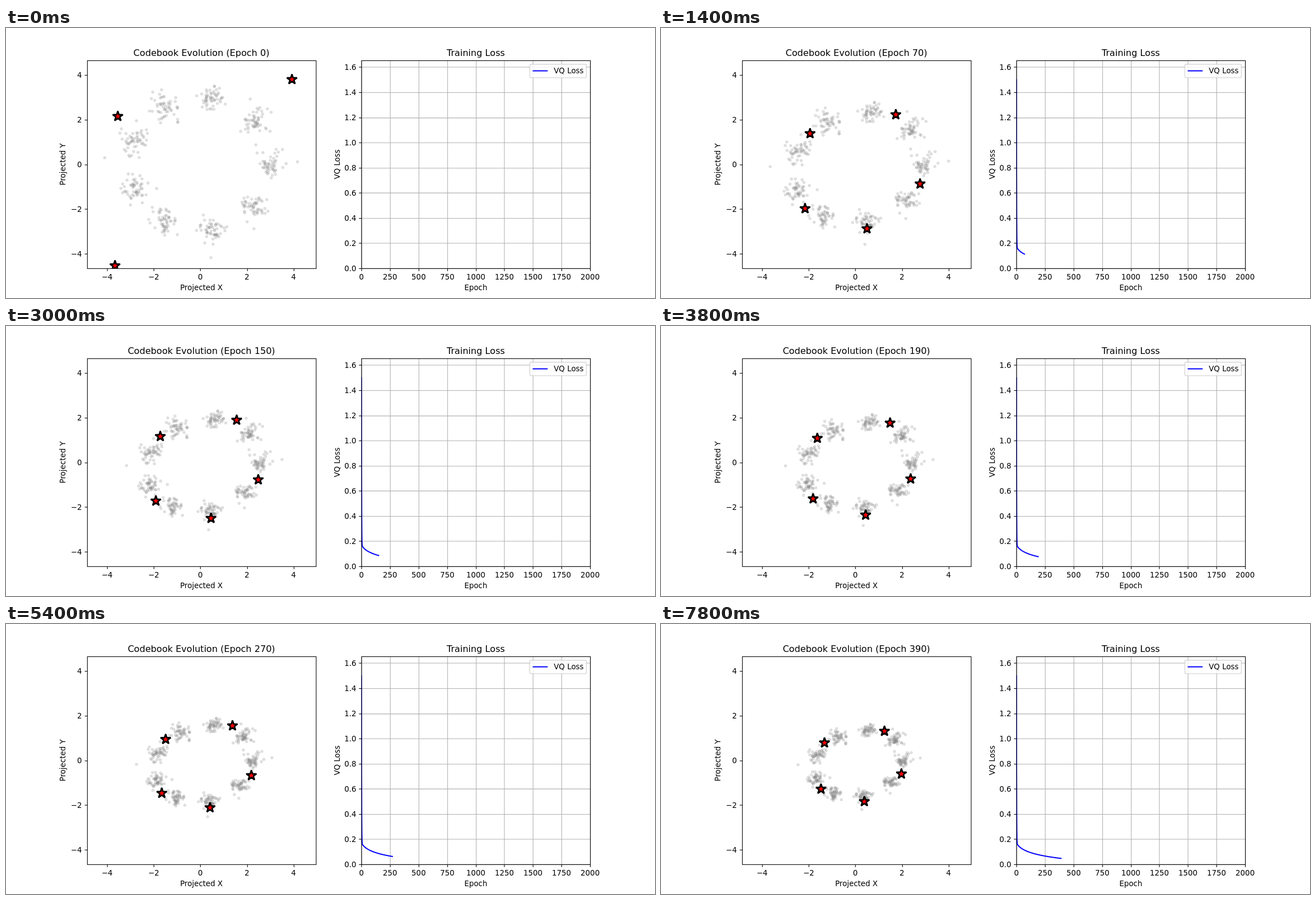
Animation of 1159x483 px, one loop 8 s. Source, as an HTML page with a canvas:

```html
<!DOCTYPE html>
<html lang="en">
<head>
<meta charset="utf-8">
<title>Codebook Evolution</title>
<style>
html, body { margin: 0; width: 100%; height: 100%; overflow: hidden; background: #fff; }
canvas { display: block; }
</style>
</head>
<body>
<canvas id="stage" width="1159" height="483"></canvas>
<script>
// The figure is laid out on 1200 x 500 units and scaled to the stage
const ctx = document.getElementById('stage').getContext('2d');
ctx.scale(1159 / 1200, 483 / 500);

const LOOP = 8000, STEP = 200, EPOCHS_PER_STEP = 10;
const TOP = 60, BOTTOM = 445, HEIGHT = BOTTOM - TOP, WIDTH = 422.73;
const LEFT_PLOT = 150, RIGHT_PLOT = 657.27;
const THIN = 1.11, THICK = 2.08;

const codeX = x => 359.3 + 43.1 * x;
const codeY = y => 252.6 - 41.4 * y;
const lossX = epoch => RIGHT_PLOT + epoch * WIDTH / 2000;
const lossY = loss => BOTTOM - 232.9 * loss;

// Codebook vectors: initial place, and place once pulled onto the data
const codes = [
  { start: [3.93, 3.8], near: [1.86, 2.46] },
  { start: [-3.54, 2.15], near: [-2.1, 1.53] },
  { start: [6, -2], near: [2.98, -.94] },
  { start: [-3.66, -4.53], near: [-2.33, -2.15] },
  { start: [1, -6], near: [.53, -3.14] }
];

let seed = 7;
function random() {
  seed = (seed * 16807) % 2147483647;
  return seed / 2147483647;
}
const normal = () => Math.sqrt(-2 * Math.log(random())) * Math.cos(2 * Math.PI * random());

// Nine Gaussian clusters on a circle
const points = [];
for (let k = 0; k < 9; k++)
  for (let i = 0; i < 55; i++) {
    const angle = k * 2 * Math.PI / 9;
    points.push([3 * Math.cos(angle) + .3 * normal(), 3 * Math.sin(angle) + .3 * normal()]);
  }

// Logarithmic contraction, equal to 1 at epoch 30
const shrink = (epoch, rate, delay) => 1 - rate * Math.log((epoch + delay) / (30 + delay));

function cloudMap(epoch) {
  if (!epoch) return p => p;
  const sx = 1.03 * shrink(epoch, .197, 30), sy = .945 * shrink(epoch, .244, 30);
  return ([x, y]) => [sx * x + .035 * y + .137, sy * y + .048 * x - .15];
}

function codeAt({ start, near: [x, y] }, epoch) {
  if (!epoch) return start;
  return [
    .12 + (x - .12) * shrink(epoch, .264, 100),
    -.17 + (y + .17) * shrink(epoch, .33, 100)
  ];
}

const lossAt = epoch => .3247 - .046 * Math.log(epoch + 30) + 1.33 * Math.exp(-epoch / 1.2);

function text(str, x, y, align = 'center', size = 13.89) {
  ctx.font = `${size}px "DejaVu Sans", sans-serif`;
  ctx.textAlign = align;
  ctx.fillStyle = '#000';
  ctx.fillText(str, x, y);
}

function verticalText(str, x) {
  ctx.save();
  ctx.translate(x, TOP + HEIGHT / 2);
  ctx.rotate(-Math.PI / 2);
  text(str, 0, 0);
  ctx.restore();
}

function line(x1, y1, x2, y2, color = '#000', width = THIN) {
  ctx.strokeStyle = color;
  ctx.lineWidth = width;
  ctx.beginPath();
  ctx.moveTo(x1, y1);
  ctx.lineTo(x2, y2);
  ctx.stroke();
}

const snap = v => Math.round(v) + .5;

function xTick(x, label) {
  line(snap(x), BOTTOM + .5, snap(x), BOTTOM + 5.4);
  text(label, x, 465.5);
}

function yTick(left, y, label) {
  line(snap(left) - 4.9, snap(y), snap(left), snap(y));
  text(label, left - 9.7, y + 5.2, 'right');
}

function frame(left, title, xLabel) {
  const x = snap(left), y = snap(TOP);
  ctx.strokeStyle = '#000';
  ctx.lineWidth = THIN;
  ctx.strokeRect(x, y, snap(left + WIDTH) - x, snap(BOTTOM) - y);
  text(title, left + WIDTH / 2, 51.7, 'center', 16.67);
  text(xLabel, left + WIDTH / 2, 485.3);
}

function clipped(left, draw) {
  ctx.save();
  ctx.beginPath();
  ctx.rect(left, TOP, WIDTH, HEIGHT);
  ctx.clip();
  draw();
  ctx.restore();
}

function star(x, y) {
  ctx.beginPath();
  for (let i = 0; i < 10; i++) {
    const r = i % 2 ? 3.75 : 9.82, a = i * Math.PI / 5;
    ctx.lineTo(x + r * Math.sin(a), y - r * Math.cos(a));
  }
  ctx.closePath();
  ctx.fillStyle = '#f00';
  ctx.fill();
  ctx.strokeStyle = '#000';
  ctx.lineWidth = 2.78;
  ctx.lineJoin = 'bevel';
  ctx.stroke();
}

function drawCloud(epoch) {
  ctx.fillStyle = ctx.strokeStyle = 'rgba(128,128,128,.2)';
  ctx.lineWidth = 1.39;
  for (const [x, y] of points.map(cloudMap(epoch))) {
    ctx.beginPath();
    ctx.arc(codeX(x), codeY(y), 2.2, 0, 2 * Math.PI);
    ctx.fill();
    ctx.stroke();
  }
}

function drawCodebook(epoch) {
  clipped(LEFT_PLOT, () => {
    drawCloud(epoch);
    for (const code of codes) {
      const [x, y] = codeAt(code, epoch);
      star(codeX(x), codeY(y));
    }
  });
  for (let v = -4; v <= 4; v += 2) {
    const label = String(v).replace('-', '\u2212');
    xTick(codeX(v), label);
    yTick(LEFT_PLOT, codeY(v), label);
  }
  frame(LEFT_PLOT, `Codebook Evolution (Epoch ${epoch})`, 'Projected X');
  verticalText('Projected Y', 109.7);
}

function drawLossCurve(epoch) {
  ctx.strokeStyle = '#00f';
  ctx.lineWidth = THICK;
  ctx.lineCap = 'square';
  ctx.lineJoin = 'round';
  ctx.beginPath();
  for (let e = 0; e <= epoch; e++) ctx.lineTo(lossX(e), lossY(lossAt(e)));
  ctx.stroke();
}

function drawLegend() {
  ctx.beginPath();
  ctx.roundRect(968.5, 67, 104.6, 25, 2.8);
  ctx.fillStyle = 'rgba(255,255,255,.8)';
  ctx.fill();
  ctx.strokeStyle = 'rgba(204,204,204,.8)';
  ctx.lineWidth = 1.39;
  ctx.stroke();
  line(973.8, 79.3, 1001.6, 79.3, '#00f', THICK);
  text('VQ Loss', 1012.8, 84, 'left');
}

function drawLoss(epoch) {
  const ticks = [...Array(9).keys()].map(i => ({
    epoch: i * 250, x: lossX(i * 250), loss: (i * .2).toFixed(1), y: lossY(i * .2)
  }));
  for (const { x, y } of ticks) {
    line(snap(x), TOP, snap(x), BOTTOM, '#b0b0b0');
    line(RIGHT_PLOT, snap(y), RIGHT_PLOT + WIDTH, snap(y), '#b0b0b0');
  }
  if (epoch) clipped(RIGHT_PLOT, () => drawLossCurve(epoch));
  for (const tick of ticks) {
    xTick(tick.x, tick.epoch);
    yTick(RIGHT_PLOT, tick.y, tick.loss);
  }
  frame(RIGHT_PLOT, 'Training Loss', 'Epoch');
  verticalText('VQ Loss', 616.6);
  drawLegend();
}

let shown = -1;
function tick() {
  const epoch = Math.floor(performance.now() % LOOP / STEP) * EPOCHS_PER_STEP;
  if (epoch !== shown) {
    shown = epoch;
    ctx.fillStyle = '#fff';
    ctx.fillRect(0, 0, 1200, 500);
    drawCodebook(epoch);
    drawLoss(epoch);
  }
  requestAnimationFrame(tick);
}
tick();
</script>
</body>
</html>
```
